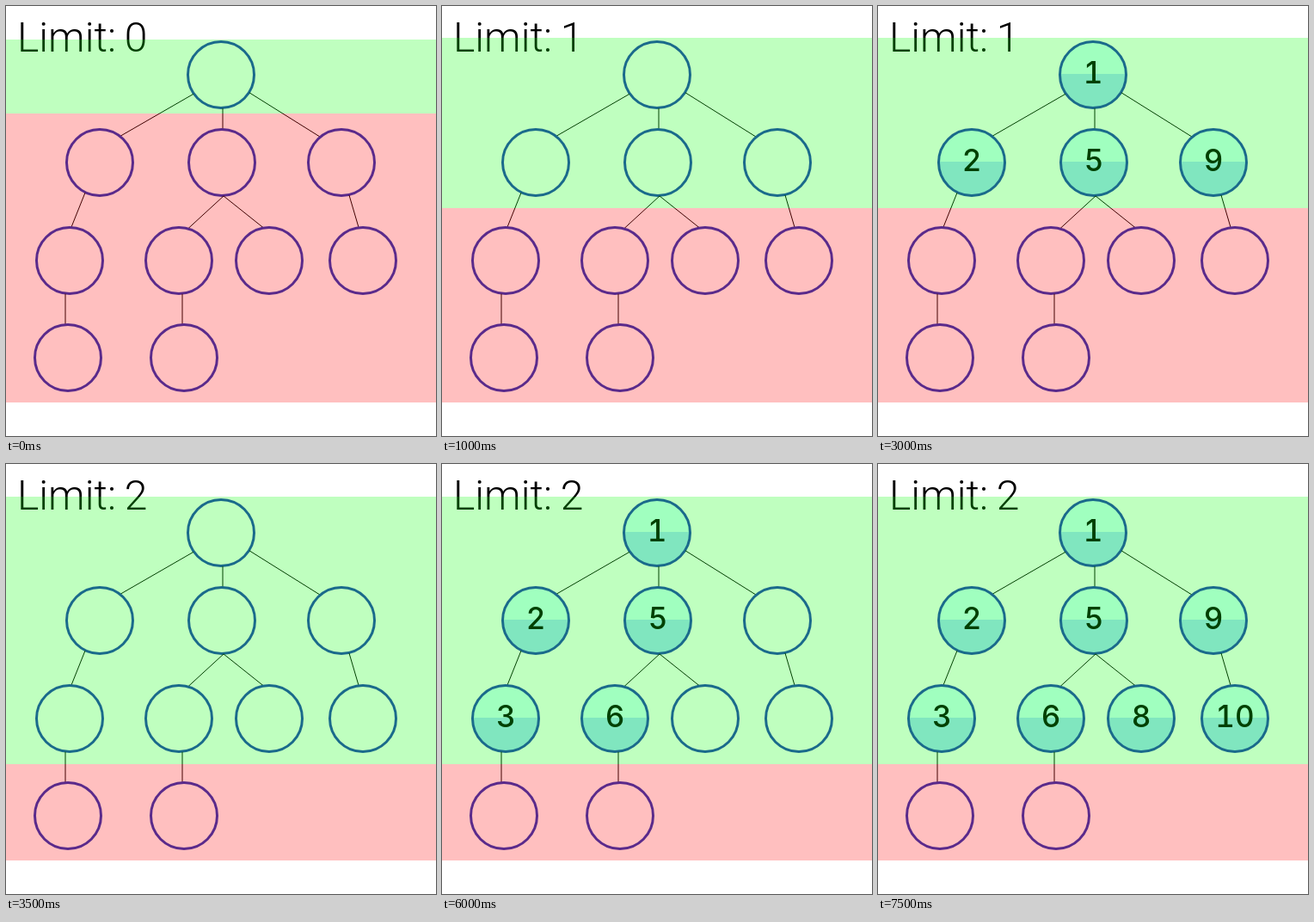
An HTML page for the animation above (8000 ms loop, 500 px wide and 500 px high).

```html
<!DOCTYPE html>
<html lang="en">
<head>
<meta charset="utf-8">
<title>Depth-limited search</title>
<style>
html, body { margin: 0; width: 100%; height: 100%; overflow: hidden; background: #fff; }
svg { display: block; width: 500px; height: 500px; }
.title { font: 300 48px Roboto, sans-serif; word-spacing: -2px; }
.label { font: 500 35px Inter, sans-serif; font-feature-settings: "tnum"; text-anchor: middle; }
.edge { stroke: #000; }
.ring { fill: none; stroke: #2238b9; stroke-width: 3; }
</style>
</head>
<body>
<svg viewBox="0 0 500 500">
  <defs>
    <linearGradient id="fill" x2="0" y2="1">
      <stop offset=".487" stop-color="#d5ffff"/>
      <stop offset=".487" stop-color="#aaddff"/>
    </linearGradient>
  </defs>
  <text class="title" id="title" x="13" y="53"></text>
  <g id="tree"></g>
  <rect id="inside" width="500" fill="#0f0" fill-opacity=".25"/>
  <rect id="outside" width="500" fill="#f00" fill-opacity=".25"/>
</svg>
<script>
const STEP = 500, LOOP = 8000, BOTTOM = 461, RADIUS = 38.5;
const byId = id => document.getElementById(id);

// Row of nodes at each depth, and the green band when that depth is the limit
const levels = [
  { y: 80, top: 39, end: 125 },
  { y: 182, top: 37, end: 235 },
  { y: 296, top: 38, end: 349 },
  { y: 409 }
];

// Preorder: depth, x, and the x where the edge leaves the parent and meets the node
const nodes = [
  [0, 250],
  [1, 109, 218, 133], [2, 74, 92, 76], [3, 72, 69, 69],
  [1, 251, 252, 252], [2, 201, 253, 212], [3, 207, 205, 205], [2, 306, 253, 299],
  [1, 390, 283, 365], [2, 415, 399, 410]
].map(([depth, x, from, to], i) => ({ depth, x, from, to, y: levels[depth].y, number: i + 1 }));

const drop = (node, x) => Math.sqrt(39 ** 2 - (x - node.x) ** 2);

function edge(node) {
  const parent = nodes.findLast(p => p.number < node.number && p.depth === node.depth - 1);
  if (!parent) return "";
  const { from, to } = node;
  return `<line class="edge" x1="${from}" y1="${parent.y + drop(parent, from)}"
    x2="${to}" y2="${node.y - drop(node, to)}"/>`;
}

byId("tree").innerHTML = nodes.map(node => {
  const { x, y, number } = node;
  return `${edge(node)}<g class="visit">
    <circle cx="${x}" cy="${y}" r="${RADIUS}" fill="url(#fill)"/>
    <text class="label" x="${x}" y="${y + 10}">${number}</text></g>
    <circle class="ring" cx="${x}" cy="${y}" r="${RADIUS}"/>`;
}).join("");
const visits = document.querySelectorAll(".visit");

function setBand(id, top, end) {
  byId(id).setAttribute("y", top);
  byId(id).setAttribute("height", end - top);
}

// Each limit shows an empty tree, then visits one reachable node per step
function stateAt(step) {
  for (let limit = 0; ; limit++) {
    const order = nodes.filter(n => n.depth <= limit);
    if (step <= order.length) return { limit, visited: order.slice(0, step) };
    step -= order.length + 1;
  }
}

function draw() {
  const { limit, visited } = stateAt(Math.floor(performance.now() % LOOP / STEP));
  const { top, end } = levels[limit];
  byId("title").textContent = "Limit: " + limit;
  setBand("inside", top, end);
  setBand("outside", end, BOTTOM);
  nodes.forEach((node, i) => visits[i].style.display = visited.includes(node) ? "" : "none");
  requestAnimationFrame(draw);
}
draw();
</script>
</body>
</html>
```
